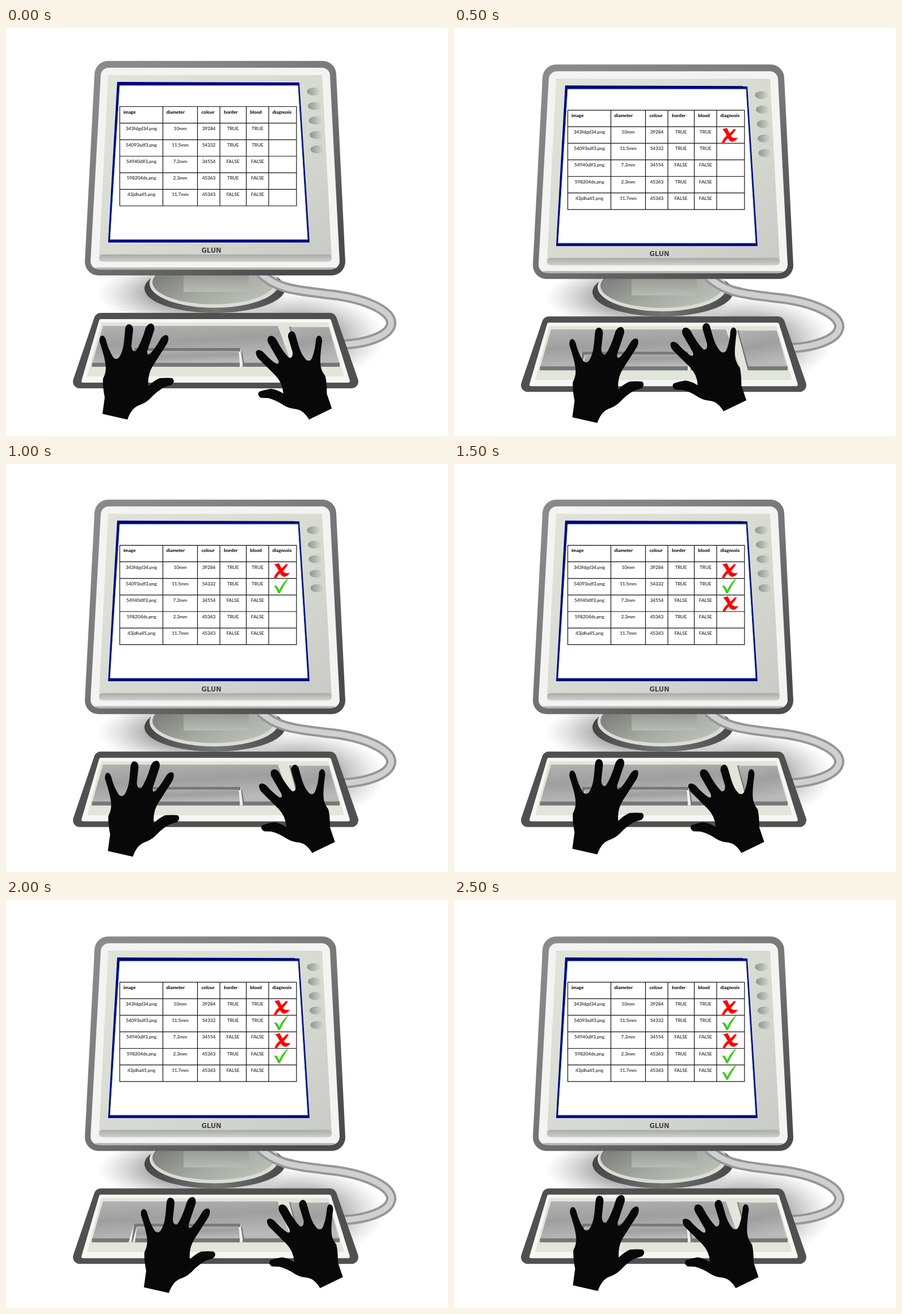
Animation, 779 px wide and 719 px high, one loop 3 s. Source, as an HTML page:

```html
<!DOCTYPE html>
<html>
<head>
<meta charset="utf-8">
<style>
html, body { margin: 0; width: 100%; height: 100%; overflow: hidden; background: #fff }
svg { display: block }
.round { stroke-linejoin: round }
#table { font: 8.2px Lato, sans-serif; fill: #222; stroke: #222; stroke-width: .1 }
#table .head { font-weight: bold; fill: #000 }
#table path { fill: none; stroke: #111; stroke-width: 1.2 }
</style>
</head>
<body>
<svg width="779" height="719" viewBox="0 0 779 719">
<defs>
  <linearGradient id="frame" gradientUnits="userSpaceOnUse" x1="230" y1="60" x2="480" y2="440">
    <stop offset="0" stop-color="#8a8a8a"/><stop offset=".5" stop-color="#777"/><stop offset="1" stop-color="#4c4c4c"/>
  </linearGradient>
  <linearGradient id="panel" x1="0" y1="0" x2="1" y2="1">
    <stop offset="0" stop-color="#e0e4da"/><stop offset=".6" stop-color="#d5d9d0"/><stop offset="1" stop-color="#c9cbc6"/>
  </linearGradient>
  <linearGradient id="ledge" x1="0" y1="0" x2="0" y2="1">
    <stop offset="0" stop-color="#a9aaa6"/><stop offset="1" stop-color="#d0d2cd"/>
  </linearGradient>
  <linearGradient id="knob">
    <stop offset=".1" stop-color="#999b96"/><stop offset="1" stop-color="#d6dad1"/>
  </linearGradient>
  <linearGradient id="foot" x1="0" y1="0" x2="1" y2="0">
    <stop offset="0" stop-color="#454545"/><stop offset=".5" stop-color="#737573"/><stop offset="1" stop-color="#484848"/>
  </linearGradient>
  <linearGradient id="plate" x1="0" y1=".3" x2="1" y2="1">
    <stop offset="0" stop-color="#777a75"/><stop offset=".5" stop-color="#a5aaa2"/><stop offset="1" stop-color="#c2c7be"/>
  </linearGradient>
  <linearGradient id="neck" x1="0" y1="0" x2="0" y2="1">
    <stop offset="0" stop-color="#92958f"/><stop offset="1" stop-color="#b9bcb5"/>
  </linearGradient>
  <linearGradient id="keys" x1="0" y1="0" x2=".3" y2="1">
    <stop offset="0" stop-color="#b2b2b2"/><stop offset=".5" stop-color="#9f9f9f"/><stop offset="1" stop-color="#b9b9b9"/>
  </linearGradient>
  <radialGradient id="shade">
    <stop offset="0" stop-color="#555" stop-opacity=".9"/><stop offset=".5" stop-color="#777" stop-opacity=".55"/>
    <stop offset="1" stop-color="#999" stop-opacity="0"/>
  </radialGradient>
  <path id="cable" fill="none" d="M448 432C480 462 515 462 565 469C630 475 679 497 679 520C678 541 640 556 590 558"/>
  <path id="hand" d="M170 680L174 651Q170 630 171 618Q178 605 175 590Q173 577 165 553Q164 543 170 542Q175 543 177 553
    Q181 567 187 577Q192 587 199 581Q206 571 208 553L210 531Q211 522 217 522Q224 523 224 532L221 560Q222 572 229 569
    Q238 556 246 529Q250 520 257 521Q263 524 261 533L249 569Q248 579 255 573Q264 563 273 547Q279 539 285 542
    Q288 547 284 556L259 595Q249 611 251 631Q261 621 271 617Q284 616 293 617Q299 622 292 629L279 633
    Q266 640 254 653Q246 661 234 665Q221 670 214 690Z"/>
  <path id="cross" fill="#f00" d="M473 172L481 170Q485 178 488 184Q491 189 500 187Q497 193 491 194Q486 194 483 188Q478 177 473 172Z
    M493 172L497 172Q494 178 488 184Q479 190 476 197L472 197Q473 190 481 183Q489 177 493 172Z"/>
  <path id="tick" fill="#3ecb1f" d="M472.500 181L476 180Q480 184 481.500 188Q487 176 496 168.500L497 169Q489 181 482.500 194L480 194Q477 187 472.500 181Z"/>
</defs>

<g id="desk">
  <ellipse cx="329" cy="468" rx="167" ry="58" fill="url(#shade)"/>
  <ellipse cx="512" cy="545" rx="156" ry="80" fill="url(#shade)"/>

  <ellipse cx="368" cy="459" rx="124" ry="43" fill="url(#foot)"/>
  <ellipse cx="367" cy="450" rx="114" ry="43" fill="#d9ddd6"/>
  <ellipse cx="366" cy="448" rx="108" ry="39" fill="url(#plate)"/>
  <path d="M313 430H428V465H313Z" fill="url(#neck)"/>

  <use href="#cable" stroke="#969696" stroke-width="18"/>
  <use href="#cable" stroke="#d0d0d0" stroke-width="10"/>

  <path class="round" d="M180 82H558L574 412H163Z" fill="url(#frame)" stroke="url(#frame)" stroke-width="48"/>
  <path class="round" d="M181 84H557L574 411H163Z" fill="#f3f4f1" stroke="#f3f4f1" stroke-width="28"/>
  <path d="M156 422H581Q577 426 570 426H167Q160 426 156 422Z" fill="#b5b6b3"/>
  <path d="M180 83H557L574 405H164Z" fill="url(#panel)"/>
  <rect x="164" y="399" width="410" height="13" rx="6" fill="url(#ledge)"/>
  <g id="knobs" fill="url(#knob)"></g>

  <path d="M196 95L517 96L535 378H180Z" fill="#00007f"/>
  <path d="M200 101H515L532 373H183Z" fill="#fff" stroke="#2f5f95"/>
  <text x="362" y="396" text-anchor="middle" font-family="DejaVu Sans, sans-serif" font-weight="bold" font-size="11.4" fill="#444">GLUN</text>
  <g id="table"></g>
  <g id="marks"></g>

  <path class="round" d="M167 514H571L609 623H130Z" fill="#505050" stroke="#505050" stroke-width="24"/>
  <path class="round" d="M167 516H570L603 622H136Z" fill="#f5f7f2" stroke="#f5f7f2" stroke-width="6"/>
  <path d="M168 519H568L596 614H143Z" fill="#e1e5da"/>
  <path d="M171 525H479L503 591H152Z" fill="url(#keys)"/>
  <path d="M152 590H503L505 597H151Z" fill="#777"/>
  <path d="M226 564H413L421 597H216Z" fill="#eef0ea"/>
  <path d="M226 564H413V570H230L223 597H221Z" fill="#777"/>
  <path d="M231 569H410L412 591H228Z" fill="url(#keys)"/>
  <path d="M228 590H412V597H227Z" fill="#777"/>
  <path d="M414 570L417 590V597H421L416 570Z" fill="#777"/>
  <path d="M499 527L502 526L588 590V597H518Z" fill="#777"/>
  <path d="M501 527H569L587 590H519Z" fill="url(#keys)"/>
</g>

<g fill="#080808">
  <use id="left" href="#hand"/>
  <g id="right"><use href="#hand" transform="matrix(-.952 .235 .172 .929 619.1 -1.25)"/></g>
</g>
</svg>
<script>
const $ = id => document.getElementById(id);
const top0 = 138.5, rowHeight = 29.17;
const columns = [200.5, 276.5, 337.5, 377, 423.5, 463, 512];
const headers = ['image', 'diameter', 'colour', 'border', 'blood', 'diagnosis'];
const headerX = [207, 282.5, 344.5, 384, 430, 469.5];
const centres = [238.7, 307, 357.5, 400, 443.3];
const rows = [
  '343fdgd34.png 10mm 39284 TRUE TRUE',
  '54093sdf3.png 11.5mm 54332 TRUE TRUE',
  '54940dlf3.png 7.2mm 34554 FALSE FALSE',
  '598204ds.png 2.3mm 45363 TRUE FALSE',
  '43jdha45.png 11.7mm 45343 FALSE FALSE'
];
const verdicts = ['cross', 'tick', 'cross', 'tick', 'tick'];

let grid = '';
for (let i = 0; i <= 6; i++) grid += `M200 ${top0 + i * rowHeight}H512.5`;
for (const x of columns) grid += `M${x} ${top0}V${top0 + 6 * rowHeight}`;
$('table').innerHTML = `<path d="${grid}"/>` +
  headers.map((h, i) => `<text class="head" x="${headerX[i]}" y="150.5">${h}</text>`).join('') +
  rows.map((row, r) => row.split(' ').map((cell, c) =>
    `<text text-anchor="middle" x="${centres[c]}" y="${179.8 + r * rowHeight}">${cell}</text>`).join('')).join('');

$('marks').innerHTML = verdicts.map((v, i) =>
  `<use href="#${v}" x="${i === 2 ? 1.5 : 0}" y="${i * rowHeight}"/>`).join('');
$('knobs').innerHTML = [0, 1, 2, 3, 4].map(i =>
  `<ellipse cx="${542.5 + i * 1.5}" cy="${112 + i * 25.5}" rx="12" ry="7"/>`).join('');

// Per step: desk drop, left hand x y, right hand x y
const poses = [
  [0, 0, 0, 0, 0],
  [6.3, 38.5, 6, -59, -14.5],
  [4.8, 9.5, 2, 5.5, -4.5],
  [4.8, 38.5, -2, -27.5, -4.5],
  [6.3, 73, 2.5, 19.5, -6],
  [6.3, 39.5, -1, -37.5, -6]
];
const move = (id, x, y) => $(id).setAttribute('transform', `translate(${x} ${y})`);

function draw(now) {
  const step = Math.floor(now % 3000 / 500);
  const [drop, lx, ly, rx, ry] = poses[step];
  move('desk', 0, drop);
  move('left', lx, ly);
  move('right', rx, ry);
  [...$('marks').children].forEach((m, i) => m.setAttribute('visibility', i < step ? 'visible' : 'hidden'));
  requestAnimationFrame(draw);
}
draw(performance.now());
</script>
</body>
</html>
```
